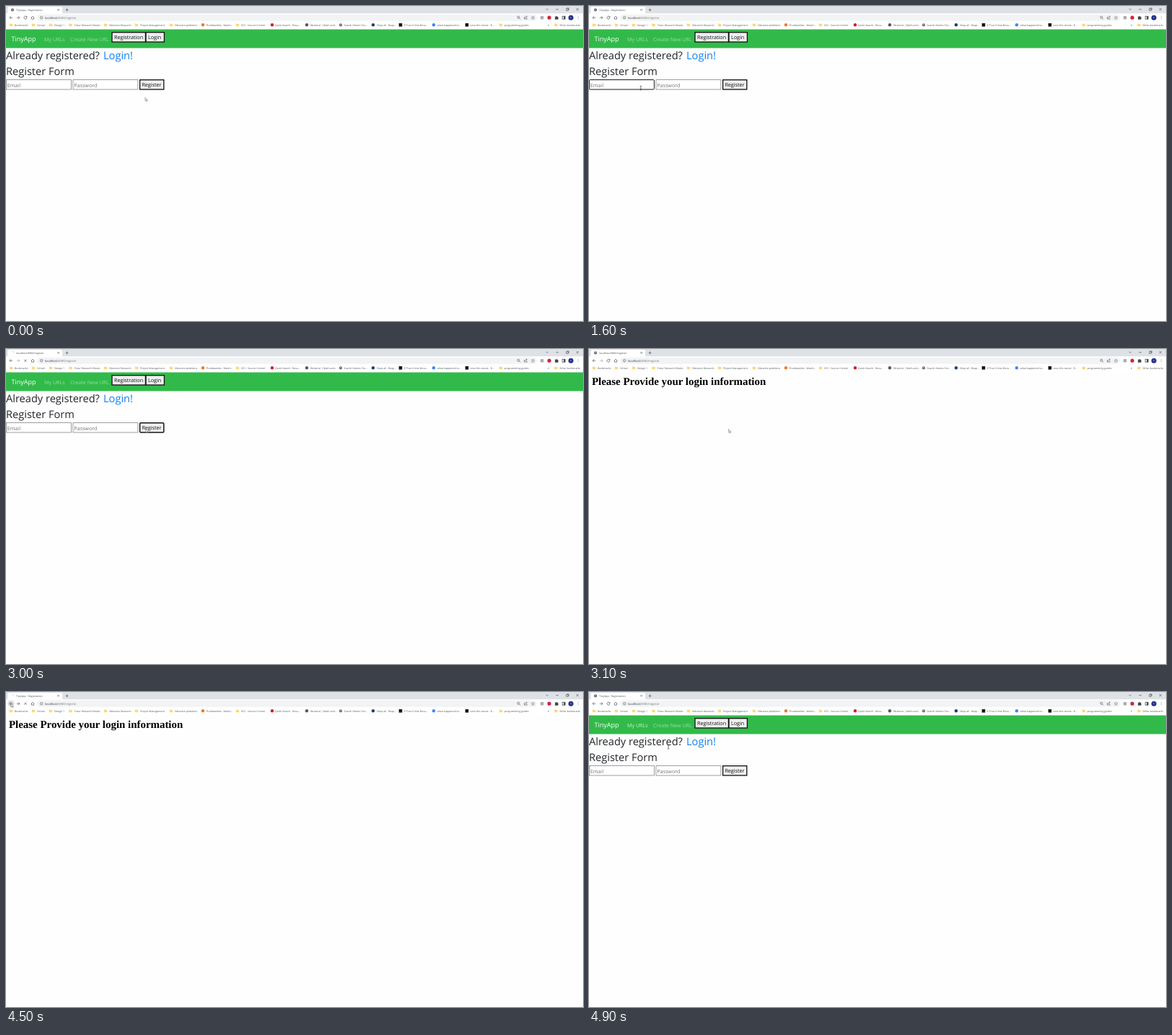
Animation of 800 by 438 pixels, one loop 5000 ms. Source, as an HTML page:

```html
<!DOCTYPE html>
<html lang="en">
<head>
<meta charset="utf-8">
<title>Registration form</title>
<style>
  html, body { margin: 0; width: 100%; height: 100%; overflow: hidden; background: #fefefe; }
  svg { display: block; width: 100%; height: 100%; }
  text { font-family: "Open Sans", "Noto Sans", sans-serif; text-rendering: geometricPrecision; white-space: pre; }
  .icon { fill: none; stroke: #5f6368; stroke-width: .75; }
  .small { font-size: 3.5px; fill: #4b4f54; }
  .nav { font-size: 7.15px; fill: #fff; fill-opacity: .5; }
  .heading { font-size: 14.6px; font-weight: 500; fill: #212529; }
  .control { font-size: 7.2px; }
  .field { fill: #fff; stroke: #858585; stroke-width: .8; }
  .button { fill: #efefef; stroke: #111; stroke-width: 1.3; }
  .focused { stroke: #161616; stroke-width: 1; }
  .button.focused { stroke-width: 1.5; }
</style>
</head>
<body>
<svg id="stage" viewBox="0 0 800 438"></svg>
<script>
const LOOP = 5000, STEP = 100;
const stage = document.getElementById('stage');

const text = (x, y, cls, content, extra = '') =>
  `<text x="${x}" y="${y}" class="${cls}" ${extra}>${content}</text>`;
const rect = (x, y, w, h, extra) =>
  `<rect x="${x}" y="${y}" width="${w}" height="${h}" ${extra}/>`;
const icon = (d, extra = '') => `<path class="icon" d="${d}" ${extra}/>`;
const dot = (x, y, r, fill) => `<circle cx="${x}" cy="${y}" r="${r}" fill="${fill}"/>`;
const globe = (x, y) => dot(x, y, 2.1, '#5f6368') +
  `<path d="M${x - 1.3} ${y - .8}l1.2 .3 .5 1.2M${x + .4} ${y - 1.4}l1 .9" fill="none" stroke="#fff" stroke-width=".5"/>`;
const folder = (x, y) =>
  `<path d="M${x - 2.2} ${y - 1.9}h1.7l.6 .6h2.1v3.2h-4.4z" fill="#f9d978"/>`;

// icon kind or colour, icon x, label x, label
const bookmarks = [
  ['folder', 7, 12, 'Bookmarks'],
  ['folder', 38, 43, 'School'],
  ['folder', 62, 67, 'Design 1'],
  ['folder', 89.5, 95, 'Futur Research Books'],
  ['folder', 138, 143, 'Vibration Research'],
  ['folder', 181, 186, 'Project Management'],
  ['folder', 229, 234, 'Vibration problems'],
  ['#ef7a24', 273, 277.5, 'Plumbowlets - Watch...'],
  ['folder', 321, 326, 'VCS - Source Control'],
  ['#c8202f', 369, 373, 'Quick Search - Resu...'],
  ['#555a60', 417, 422, 'Wistorial | Math and...'],
  ['globe', 464, 468.5, 'Search Homes For...'],
  ['#1f3f70', 509, 514, 'Shop all - Reap...'],
  ['square', 547, 552, 'E True Crime Docu...'],
  ['#4285f4', 593, 598, 'what happened to...'],
  ['square', 639, 643.5, 'Love this movie - R...'],
  ['folder', 686, 691, 'programming guides'],
  ['folder', 762.5, 767.5, 'Other bookmarks'],
];

function bookmark([kind, x, labelX, label]) {
  const y = 26.3;
  const mark = kind === 'folder' ? folder(x, y)
    : kind === 'globe' ? globe(x, y)
    : kind === 'square' ? rect(x - 2.3, y - 2.3, 4.6, 4.6, 'fill="#151515"')
    : dot(x, y, 2.2, kind);
  return mark + text(labelX, 27.5, 'small', label);
}

const browser = `
  ${rect(0, 0, 800, 10.5, 'fill="#dee1e6"')}
  <path d="M1 10.5q1.5 0 1.5-2V3q0-2 2-2H76q2 0 2 2v5.5q0 2 1.5 2z" fill="#fff"/>
  <g id="favicon">${globe(9, 5.3)}</g>
  <path id="spinner" class="icon" d="M9 3.4a1.9 1.9 0 0 1 1.9 1.9" style="stroke:#aab4c4;stroke-width:.5"/>
  <text id="tabTitle" x="14" y="6.5" class="small" style="font-size:3.6px"></text>
  ${icon('M71.4 4.1l2.4 2.4m0-2.4l-2.4 2.4M84.5 3.4v4m-2-2h4')}
  ${icon('M748.7 3.8l1.6 1.5 1.6-1.5M762.4 4.7h3.6M776.8 3.7h2.6v2.6h-2.6zM777.7 3.7v-.8h2.6v2.6h-.8M790.7 3l3.2 3.2m0-3.2l-3.2 3.2')}
  ${rect(0, 10.5, 800, 22, 'fill="#fff"')}
  ${rect(43, 11.7, 693, 9, 'rx="4.5" fill="#f1f3f4"')}
  <circle id="backHover" cx="7" cy="16.2" r="4.4" fill="#d9dbde"/>
  ${icon('M9.2 16.2H5m2-2l-2 2 2 2')}
  <path id="forward" class="icon" d="M14.8 16.2H19m-2-2l2 2-2 2"/>
  <path id="reload" class="icon" d="M28.4 14.8a2 2 0 1 0 .5 1.7M29 13.9v1.7h-1.7"/>
  <path id="stop" class="icon" d="M25.3 14.6l3.2 3.2m0-3.2l-3.2 3.2"/>
  ${icon('M34.8 16.2l2.2-2 2.2 2M35.5 15.8v2.4h3v-2.4')}
  <circle cx="49.2" cy="16.2" r="1.8" class="icon" style="stroke-width:.6"/>
  ${icon('M49.2 16v1.2M49.2 15.1v.4', 'style="stroke-width:.5"')}
  ${text(54, 17.6, '', '<tspan fill="#30343a">localhost:</tspan><tspan fill="#777b80">8080/register</tspan>', 'font-size="4.1"')}
  <circle cx="710.4" cy="15.7" r="1.5" class="icon"/>
  ${icon('M711.5 16.8l1.6 1.6M718.7 15v3h3.6v-1.2M719.8 16.6q.2-1.8 2.5-1.9m-1-1l1.1 1-1.1 1')}
  ${icon('M730.6 14l.7 1.5 1.6.1-1.2 1.1.4 1.6-1.5-.8-1.5.8.4-1.6-1.2-1.1 1.6-.1z', 'style="stroke-width:.5"')}
  ${rect(741, 14, 4.4, 4.4, 'rx=".6" fill="#a9adb2"')}
  ${dot(753.2, 16.2, 2.6, '#d3263f')}
  <path d="M761 14.8h1.4a1 1 0 0 1 1.9 0h1.1v1.3a1 1 0 0 1 0 1.8v.9H761v-1.4a.9.9 0 0 0 0-1.4z" fill="#44484d"/>
  ${rect(771.2, 14.2, 4, 4, 'fill="none" stroke="#3c4043" stroke-width=".7"')}
  ${rect(773.3, 14.2, 1.9, 4, 'fill="#3c4043"')}
  ${dot(783.2, 16.2, 3.5, '#26318c')}
  ${text(783.2, 17.3, '', 'k', 'font-size="3" fill="#fff" text-anchor="middle"')}
  ${[14.5, 16.2, 17.9].map(y => dot(793.2, y, .45, '#4b4f54')).join('')}
  ${bookmarks.map(bookmark).join('')}
  ${text(751, 27.5, 'small', '»', 'style="font-size:4.5px"')}
`;

const button = (id, x, y, w, label, labelX) =>
  rect(x, y, w, 13.3, `id="${id}" class="button"`) +
  text(labelX, y + 9.7, 'control', label, 'fill="#111"');
const field = (id, x, label) =>
  rect(x, 102.6, 90, 13.4, `id="${id}" class="field"`) +
  text(x + 1.3, 112.5, 'control', label, 'fill="#757575"');

const formPage = `<g id="formPage">
  ${rect(0, 32.5, 800, 26, 'fill="#31ba49"')}
  ${text(7.5, 49.1, '', 'TinyApp', 'font-size="9" font-weight="500" fill="#fff"')}
  ${text(53, 48.7, 'nav', 'My URLs', 'id="urlsLink"')}
  ${text(89, 48.7, 'nav', 'Create New URL')}
  ${button('navRegister', 147, 36.7, 46.4, 'Registration', 150)}
  ${button('navLogin', 194, 36.7, 25.4, 'Login', 197)}
  ${text(0, 74, 'heading', 'Already registered?')}
  ${text(135, 74, 'heading', 'Login!', 'style="fill:#0f80f2"')}
  ${text(0, 95.5, 'heading', 'Register Form')}
  ${field('email', .4, 'Email')}
  ${field('password', 92.9, 'Password')}
  ${button('register', 185.6, 102.7, 33.2, 'Register', 188.4)}
</g>`;

const noticePage = `<g id="noticePage">${text(4, 49.7, '', 'Please Provide your login information',
  `style="font:bold 14.92px 'Liberation Serif','Times New Roman',serif"`)}</g>`;

const pointer = `<g id="pointer">
  <path id="arrow" d="M0 0v4.6l1.1-1 .8 1.8.8-.4-.8-1.6h1.5z" fill="#fff" stroke="#555" stroke-width=".5"/>
  <path id="beam" d="M-1.2-2.8h.8l.4.4.4-.4h.8M0-2.4v4.8M-1.2 2.8h.8l.4-.4.4.4h.8" fill="none" stroke="#222" stroke-width=".65"/>
</g>`;

stage.innerHTML = rect(0, 0, 800, 438, 'fill="#fefefe"') + browser + formPage + noticePage + pointer;
const el = Object.fromEntries([...stage.querySelectorAll('[id]')].map(node => [node.id, node]));

// time, x, y
const path = [
  [0, 193, 127.3], [600, 193.5, 126.4], [900, 193.5, 126.8], [1000, 193.5, 126.8],
  [1600, 71.8, 114], [1700, 71.8, 114], [2200, 106, 112], [2300, 108, 112],
  [2700, 193.6, 111.5], [3400, 193.6, 111.5], [4000, 22, 22.5], [4300, 7, 16.4],
  [4500, 7, 16.4], [4900, 110, 76.3],
];

function pointerAt(t) {
  const i = path.findIndex(([end]) => end >= t);
  if (i <= 0) return path[0].slice(1);
  const [t0, x0, y0] = path[i - 1], [t1, x1, y1] = path[i];
  const p = (t - t0) / (t1 - t0), eased = p * p * (3 - 2 * p);
  return [x0 + (x1 - x0) * eased, y0 + (y1 - y0) * eased];
}

const within = (t, from, to) => t >= from && t < to;
const show = (node, visible) => node.setAttribute('visibility', visible ? 'visible' : 'hidden');

function focus(node, on) {
  node.classList.toggle('focused', on);
  node.setAttribute('rx', on ? 1.2 : 0);
}

function render(now) {
  const t = Math.floor((now % LOOP) / STEP) * STEP;
  const loading = t === 3000 || t === 4500;
  const notice = within(t, 3100, 4600);
  const [x, y] = pointerAt(t);
  const overField = y > 102 && y < 116.5 && x < 183;
  const beam = !notice && (overField || t === 4900);

  show(el.formPage, !notice);
  show(el.noticePage, notice);
  show(el.favicon, !loading);
  show(el.spinner, loading);
  show(el.stop, loading);
  show(el.reload, !loading);
  show(el.backHover, t === 4500);
  el.tabTitle.textContent = within(t, 3000, 4500) ? 'localhost:8080/register' : 'TinyApp - Registration';
  el.forward.setAttribute('opacity', within(t, 3000, 4500) ? .5 : 1);
  el.urlsLink.style.fillOpacity = t >= 4800 ? .75 : .5;

  focus(el.email, within(t, 1600, 2200));
  focus(el.password, within(t, 2200, 2900));
  focus(el.register, within(t, 2900, 3100));

  el.pointer.setAttribute('transform', `translate(${x} ${y})`);
  show(el.arrow, !beam);
  show(el.beam, beam);
}

const start = performance.now();
function tick() {
  render(performance.now() - start);
  requestAnimationFrame(tick);
}
tick();
</script>
</body>
</html>
```
